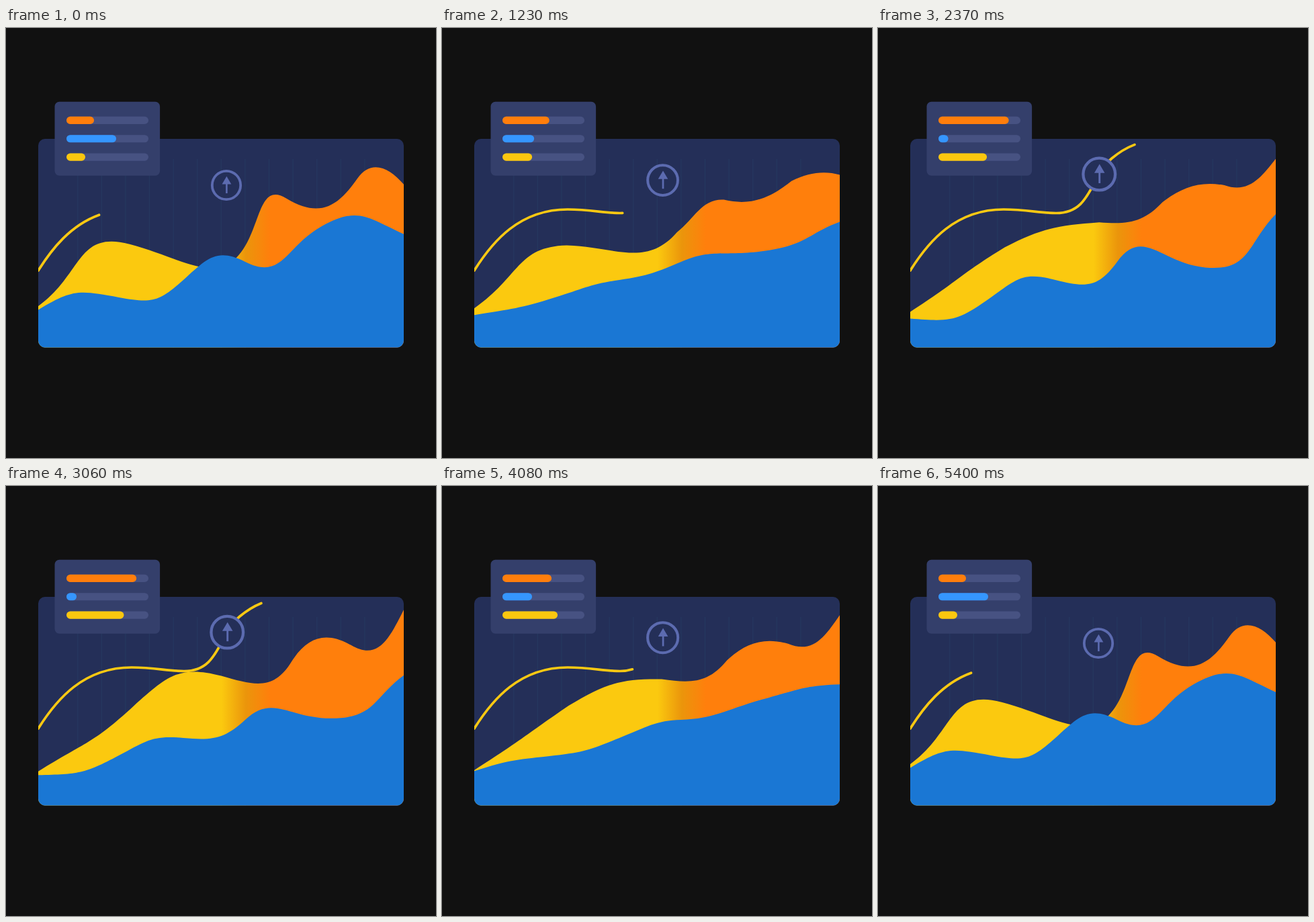
Animation of 640x640 px, one loop 5.43 s. Source, as an HTML page:

```html
<!DOCTYPE html>
<html lang="en">
<head>
<meta charset="utf-8">
<title>Area chart</title>
<style>
  html, body { margin: 0; width: 100%; height: 100%; overflow: hidden; background: #111; }
  svg { display: block; width: 100vw; height: 100vh; }
</style>
</head>
<body>
<svg viewBox="0 0 640 640">
  <defs>
    <clipPath id="panelClip"><rect x="48" y="165" width="544" height="310.5" rx="10"/></clipPath>
    <linearGradient id="warmFill" gradientUnits="userSpaceOnUse" x1="321" y1="0" x2="393" y2="0">
      <stop offset="0" stop-color="#fbc90f"/>
      <stop offset=".5" stop-color="#eb950b"/>
      <stop offset="1" stop-color="#ff7f0c"/>
    </linearGradient>
  </defs>

  <g clip-path="url(#panelClip)">
    <rect x="48" y="165" width="544" height="311" fill="#242f58"/>
    <path id="grid" stroke="#25375f" stroke-width="1.3"/>
    <path id="trend" fill="none" stroke="#fbc912" stroke-width="3.7" stroke-linecap="round"
      d="M48 361C75 318 115 270 187 270C222 270 240 275.5 265 275.5C318 275.5 315 222 348 194C360 184 372 177 385 172.5L398 169"/>
    <path id="warmArea" fill="url(#warmFill)"/>
    <path id="blueArea" fill="#1a77d4"/>
  </g>

  <g id="badge">
    <circle r="21.2" fill="#242f58" stroke="#5c6bb0" stroke-width="3.8"/>
    <path d="M.4 -4V12" stroke="#5c6bb0" stroke-width="2.6"/>
    <path d="M-6.5 -1.6L.4 -13.3L7.3 -1.6Z" fill="#5c6bb0"/>
  </g>

  <rect x="72.5" y="109.7" width="156.6" height="110" rx="7" fill="#343f6b"/>
  <g id="bars"></g>
</svg>

<script>
const LOOP = 5430, CYCLE = 5400, STEP = 30;
const $ = id => document.getElementById(id);
const mix = (a, b, s) => a + (b - a) * s;

// Turns key points [x, y, slope] into Bézier coordinates of a smooth curve;
// every handle follows the slope for half the distance to the next key point.
function smooth(keys) {
  const handle = ([x, y, slope], reach) => {
    const angle = Math.atan(slope);
    return [x + reach * Math.cos(angle), y + reach * Math.sin(angle)];
  };
  return keys.flatMap((key, i) => {
    const end = key.slice(0, 2);
    if (!i) return end;
    const prev = keys[i - 1];
    const reach = Math.hypot(key[0] - prev[0], key[1] - prev[1]) / 2;
    return [...handle(prev, reach), ...handle(key, -reach), ...end];
  });
}

const areas = [
  {
    node: $('warmArea'), peak: 3540,
    from: smooth([[48, 414, -.72], [184, 321.8, .26], [362, 313, -2.1],
      [417, 253.5, .6], [523, 224, -1.45], [600, 243, 1.4]]),
    to: smooth([[48, 425.3, -.62], [190, 328, -1], [318, 281, .33],
      [426, 261, -1.8], [513, 237.5, .65], [600, 165, -2]])
  },
  {
    node: $('blueArea'), peak: 2190,
    from: smooth([[48, 419.5, -.6], [168, 401, .18], [264, 375, -.9],
      [356, 348, .5], [470, 295, -.56], [602, 311, .42]]),
    to: smooth([[48, 432.7, .08], [168, 401, -.72], [264, 375, .26],
      [356, 348, -1.4], [487, 357, .1], [602, 267, -.9]])
  }
];

const bars = [
  { color: '#ff7e0c', from: 41, to: 107.3, peak: 2700 },
  { color: '#3596ff', from: 74, to: 12, peak: 2700 },
  { color: '#fbc70f', from: 28, to: 90.3, peak: 3690 }
];

function addBar(y, width, fill) {
  const bar = document.createElementNS('http://www.w3.org/2000/svg', 'rect');
  const attrs = { x: 90, y, width, height: 11.2, rx: 5.6, fill };
  for (const name in attrs) bar.setAttribute(name, attrs[name]);
  return $('bars').appendChild(bar);
}

bars.forEach((bar, i) => {
  const y = 131.8 + 27.35 * i;
  addBar(y, 122, '#475282');
  bar.node = addBar(y, bar.from, bar.color);
});

let gridLines = '';
for (let i = 0; i < 13; i++) gridLines += `M${106.7 + 35.6 * i} 195V476`;
$('grid').setAttribute('d', gridLines);

// Eases 0 -> 1 until the peak, then back to 0 by the end of the cycle.
function swing(t, peak) {
  const u = t < peak ? t / peak : (CYCLE - t) / (CYCLE - peak);
  return u * u * (3 - 2 * u);
}

function draw(t) {
  for (const { node, from, to, peak } of areas) {
    const s = swing(t, peak);
    const p = from.map((v, i) => mix(v, to[i], s).toFixed(2));
    node.setAttribute('d', `M${p.slice(0, 2)}C${p.slice(2)}V480H48Z`);
  }
  for (const { node, from, to, peak } of bars)
    node.setAttribute('width', mix(from, to, swing(t, peak)));

  const s = swing(t, 2700);
  $('trend').setAttribute('stroke-dasharray', `${mix(125, 427.5, s)} 1000`);
  $('badge').setAttribute('transform',
    `translate(${mix(328, 329.3, s)} ${mix(234, 216.8, s)}) scale(${mix(1, 1.13, s)})`);
}

const begin = performance.now();
function tick() {
  const t = (performance.now() - begin) % LOOP;
  draw(Math.floor(t / STEP) * STEP);
  requestAnimationFrame(tick);
}
tick();
</script>
</body>
</html>
```
